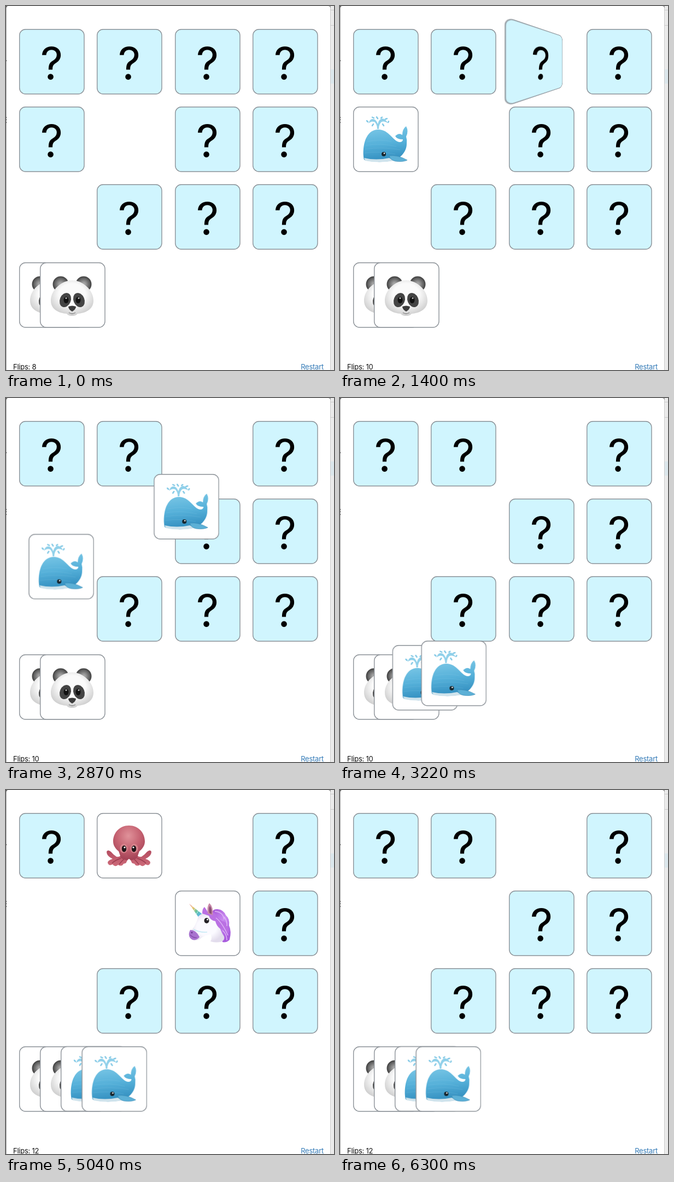
Recreate the animation shown at these times as an HTML page. Size 600 by 666 pixels, loop 6.37 s.

```html
<!DOCTYPE html>
<html lang="en">
<head>
<meta charset="utf-8">
<title>Memory cards</title>
<style>
html, body { margin: 0; width: 100%; height: 100%; overflow: hidden; background: #fff; }
#stage { position: relative; width: 600px; height: 666px; overflow: hidden; background: #fff; font: 13px/20px Inter, Roboto, sans-serif; letter-spacing: -.25px; color: #111; }
#stage > * { position: absolute; }
.slot { width: 120px; height: 120px; }
.card { position: absolute; inset: 0; transform-style: preserve-3d; }
.face { position: absolute; inset: 0; overflow: visible; backface-visibility: hidden; }
.up { transform: rotateY(180deg); }
.frame { fill: #fff; stroke: #8c9298; stroke-width: 1.4; }
.down .frame { fill: #d0f5fe; }
.mark { font: 81px Inter, Roboto, sans-serif; letter-spacing: 0; text-anchor: middle; }
.flips { left: 13px; top: 650px; white-space: pre; }
.restart { right: 19px; top: 650px; color: #337ab7; }
.defs { width: 0; height: 0; }
</style>
</head>
<body>
<div id="stage">
  <svg class="defs">
    <defs>
      <radialGradient id="fur" cx=".5" cy=".4" r=".62"><stop offset=".5" stop-color="#fafafa"/><stop offset="1" stop-color="#c9c9c9"/></radialGradient>
      <radialGradient id="ear"><stop offset=".2" stop-color="#a3a3a3"/><stop offset="1" stop-color="#4c4c4c"/></radialGradient>
      <linearGradient id="sea" x2=".15" y2="1"><stop offset="0" stop-color="#7fcae8"/><stop offset=".55" stop-color="#55b0d9"/><stop offset="1" stop-color="#338fc0"/></linearGradient>
      <radialGradient id="skin" cx=".48" cy=".3" r=".75"><stop offset="0" stop-color="#e0929a"/><stop offset=".5" stop-color="#c66372"/><stop offset="1" stop-color="#9d3c50"/></radialGradient>
      <linearGradient id="arm" x2="0" y2="1"><stop offset="0" stop-color="#b44d60"/><stop offset="1" stop-color="#cd6b7a"/></linearGradient>
      <linearGradient id="horn" x2="1" y2="1"><stop offset="0" stop-color="#e8a0b0"/><stop offset=".3" stop-color="#e9c568"/><stop offset=".55" stop-color="#61c5a4"/><stop offset=".8" stop-color="#5cb4e5"/><stop offset="1" stop-color="#b18be0"/></linearGradient>
      <linearGradient id="mane" x2=".6" y2="1"><stop offset="0" stop-color="#a552d6"/><stop offset=".5" stop-color="#c98af0"/><stop offset="1" stop-color="#a75add"/></linearGradient>
      <radialGradient id="coat"><stop offset=".55" stop-color="#fbfaff"/><stop offset="1" stop-color="#e2dcec"/></radialGradient>
    </defs>
    <symbol id="panda" viewBox="0 0 120 120">
      <g fill="url(#ear)" stroke="#4a4a4a" stroke-width="2"><circle cx="38" cy="40" r="13.5"/><circle cx="80" cy="40" r="13.5"/></g>
      <path d="M59 33C79 33 98 51 98 70C98 87 82 93 69 94Q66 98 59 98Q52 98 49 94C36 93 20 87 20 70C20 51 39 33 59 33Z" fill="url(#fur)"/>
      <g fill="#444"><ellipse cx="46.500" cy="69" rx="10" ry="13.500" transform="rotate(22 46.500 69)"/><ellipse cx="71.500" cy="69" rx="10" ry="13.500" transform="rotate(-22 71.500 69)"/></g>
      <g fill="#111"><ellipse cx="48" cy="69" rx="4.500" ry="6"/><ellipse cx="70" cy="69" rx="4.500" ry="6"/></g>
      <g fill="#bbb"><circle cx="48" cy="65.500" r="1.500"/><circle cx="71" cy="65.500" r="1.500"/></g>
      <path d="M52 81Q59 78 66 81Q66 86 59 90Q52 86 52 81Z" fill="#3c3c3c"/>
      <path d="M53 92Q59 96 65 92" fill="none" stroke="#888" stroke-width="1.500"/>
    </symbol>
    <symbol id="whale" viewBox="0 0 120 120">
      <path d="M44 41Q44 32 39 28Q33 26 28 31Q31 21 38 23Q43 25 45 32Q47 24 52 22Q59 21 63 30Q57 26 52 28Q47 32 47 41Z" fill="#8fd0ea"/>
      <path d="M35 19.500L38 21M43 19L45 22M53 19.500L51 21M62 22L59 23M25 26L27 28M65 27L64 29M37 32L35 35M54 32L56 35" fill="none" stroke="#83c9e6" stroke-width="2.500" stroke-linecap="round"/>
      <path d="M19 92C17 63 27 42 46 42C66 42 72 63 85 65Q91 65 91 60Q80 60 77 54Q84 47 90 52Q90 41 97 36Q102 45 97 55Q99 61 98 68C98 83 86 96 71 99Q45 104 21 98Q19 96 19 92Z" fill="url(#sea)"/>
      <path d="M20 94Q42 99 66 94L75 99Q47 104 22 99Z" fill="#cfe3ec"/>
      <path d="M26 64Q49 59 70 64M23 71Q50 66 79 73M22 78Q51 73 86 79M21 85Q47 81 77 87" fill="none" stroke="#a9dcf0" stroke-opacity=".14"/>
      <path d="M66 90Q82 88 99 98Q91 102 77 100Q68 98 66 90Z" fill="#5cb0d6" stroke="#3a88b2" stroke-width=".6"/>
      <circle cx="56" cy="87" r="4" fill="#17262e"/><circle cx="57" cy="85.500" r="1.300" fill="#fff"/>
    </symbol>
    <symbol id="octopus" viewBox="0 0 120 120">
      <g id="arms">
        <path id="tentacle" d="M47 72Q44 82 36 80Q30 76 26 71Q20 66 18 71Q18 79 29 84Q20 87 20 91Q22 98 29 94Q33 100 39 95Q46 99 49 93Q57 92 60 84L60 74Z" fill="url(#arm)"/>
        <use href="#tentacle" transform="matrix(-1 0 0 1 118 0)"/>
      </g>
      <path d="M44 83Q34 86 28 92M50 84Q45 89 41 94M74 83Q84 86 90 92M68 84Q73 89 77 94" fill="none" stroke="#9c3d4f" stroke-width="1.500"/>
      <path d="M59 23C76 23 88 36 88 52C88 60 83 66 78 70Q76 75 74 82Q68 87 59 86Q50 87 44 82Q42 75 40 70C35 66 30 60 30 52C30 36 42 23 59 23Z" fill="url(#skin)"/>
      <path d="M53 95Q54 87 59 84Q64 87 65 95Z" fill="#fff"/>
      <g fill="#d9848d"><ellipse cx="49.500" cy="65" rx="7" ry="8.500"/><ellipse cx="68.500" cy="65" rx="7" ry="8.500"/></g>
      <g fill="#211518"><ellipse cx="50" cy="65.500" rx="4.200" ry="6"/><ellipse cx="68" cy="65.500" rx="4.200" ry="6"/></g>
      <g fill="#fff"><circle cx="51" cy="63" r="1.600"/><circle cx="67" cy="63" r="1.600"/></g>
    </symbol>
    <symbol id="unicorn" viewBox="0 0 120 120">
      <path d="M26 24L51 44L44 50Z" fill="url(#horn)"/>
      <path d="M32 29L29 33M37 33L34 38M43 37L39 43" stroke="#fff" stroke-opacity=".7"/>
      <path d="M67 42Q69 33 78 34Q89 35 93 45Q101 52 99 64Q104 74 100 90Q94 96 87 94Q81 76 67 42Z" fill="url(#mane)"/>
      <path d="M43 47Q53 38 65 39Q77 43 80 59Q82 72 90 84Q92 91 84 94Q73 96 65 93Q69 86 65 80Q55 82 49 86Q42 93 32 90Q24 86 26 77Q37 68 43 47Z" fill="url(#coat)"/>
      <path d="M28 72Q39 72 45 85Q40 92 32 90Q22 84 28 72Z" fill="#a872cf"/>
      <path d="M28 81Q33 87 40 86" fill="none" stroke="#8048a8" stroke-width="1.200"/><circle cx="31" cy="77" r="1.400" fill="#65358a"/>
      <path d="M50 42Q50 33 54 30Q58 35 61 41Q72 37 76 46Q81 55 91 57Q99 64 98 78Q91 70 83 70Q76 65 74 56Q65 55 62 46Z" fill="#ba70e3"/>
      <path d="M60 42Q58 29 63 23Q71 30 69 45Z" fill="#c98aa9"/>
      <path d="M63 41Q61 32 64 28Q68 34 67 43Z" fill="#855073"/>
      <path d="M73 38Q88 39 90 53M75 50Q86 58 97 82M90 48Q96 56 95 65M87 73Q95 79 95 91" fill="none" stroke="#dfb5f7" stroke-width="1.500"/>
      <ellipse cx="58" cy="55" rx="4.500" ry="5" fill="#242126"/><circle cx="59.500" cy="53" r="1.500" fill="#fff"/>
      <path d="M34 71Q45 77 59 76" fill="none" stroke="#c5eaf4" stroke-width="1.500"/>
    </symbol>
  </svg>
  <svg width="600" height="666">
    <path d="M.5 0V666" stroke="#aaa"/>
    <path d="M0 0H3Q1 1 0 4Z" fill="#555"/>
    <path d="M0 100H1M0 204H1M0 208H1M0 213H1" stroke="#333" stroke-width="2"/>
    <path d="M594 0H600V666H594Z" fill="#ebebeb"/>
    <path d="M594 116H600V142H594Z" fill="#dce7ec"/>
    <path d="M593.500 0V666M594 7.500H600M594 35.500H600" stroke="#cacaca"/>
    <path d="M590 0H594V4Q593 1 590 0Z" fill="#999"/>
  </svg>
  <div class="restart">Restart</div>
</div>
<script>
const LOOP = 6370, FLIP = 600, PITCH = 142.3;
const stage = document.getElementById('stage');
const gridX = col => 24 + col * PITCH;
const gridY = row => 41.7 + row * PITCH;

function play(el, prop, steps) {
  const all = [[0, steps[0][1]], ...steps, [LOOP, steps.at(-1)[1]]];
  const frames = all.map(([time, value, easing = 'linear']) => ({ offset: time / LOOP, [prop]: value, easing }));
  el.animate(frames, { duration: LOOP, iterations: Infinity });
}

const face = (side, content) =>
  `<svg class="face ${side}" viewBox="0 0 120 120"><rect class="frame" x=".7" y=".7" width="118.3" height="118.3" rx="11"/>${content}</svg>`;

function addCard(x, y, animal, faceUp = false) {
  const slot = document.createElement('div');
  slot.className = 'slot';
  slot.style.left = x + 'px';
  slot.style.top = y + 'px';
  const picture = animal ? `<use href="#${animal}" width="120" height="120"/>` : '';
  slot.innerHTML = '<div class="card">' + (faceUp
    ? face('', picture)
    : face('down', '<text class="mark" x="59.5" y="91.8">?</text>') + (animal ? face('up', picture) : '')) + '</div>';
  stage.append(slot);
  return slot;
}

const turn = angle => `perspective(125px) rotateY(${angle}deg)`;

function flip(slot, upAt, downAt) {
  const steps = [[upAt, turn(0), 'ease-in-out'], [upAt + FLIP, turn(180)]];
  if (downAt) steps.push([downAt, turn(180), 'ease-in-out'], [downAt + FLIP, turn(0)]);
  play(slot.firstChild, 'transform', steps);
}

// Matched cards pulse, then slide onto the pile.
function collect(slot, dx, dy) {
  const pose = (x, y, scale) => `translate(${x}px, ${y}px) scale(${scale})`;
  const rest = pose(0, 0, 1);
  play(slot, 'transform', [
    [2100, rest, 'ease-in-out'], [2240, pose(0, 0, 1.25), 'ease-in-out'], [2380, rest],
    [2640, rest, 'ease-in-out'], [3340, pose(dx, dy, 1)]
  ]);
}

[[0, 0], [3, 0], [3, 1], [1, 2], [2, 2], [3, 2]].forEach(([col, row]) => addCard(gridX(col), gridY(row)));
flip(addCard(gridX(1), gridY(0), 'octopus'), 3225, 5500);
flip(addCard(gridX(2), gridY(1), 'unicorn'), 3850, 5500);

const pileX = n => 24 + n * 38;
[0, 1].forEach(n => addCard(pileX(n), gridY(3), 'panda', true));

[[0, 1, 380], [2, 0, 1217]].forEach(([col, row, upAt], i) => {
  const whale = addCard(gridX(col), gridY(row), 'whale');
  flip(whale, upAt);
  collect(whale, pileX(2 + i) - gridX(col), gridY(3) - gridY(row));
});

const clicks = [0, 400, 1217, 3225, 3850, LOOP];
clicks.slice(0, -1).forEach((from, i) => {
  const to = clicks[i + 1];
  const label = document.createElement('div');
  label.className = 'flips';
  label.textContent = `Flips: ${8 + i}`;
  stage.append(label);
  const steps = from ? [[from, 0], [from, 1]] : [[0, 1]];
  steps.push([to, 1]);
  if (to < LOOP) steps.push([to, 0]);
  play(label, 'opacity', steps);
});
</script>
</body>
</html>
```
